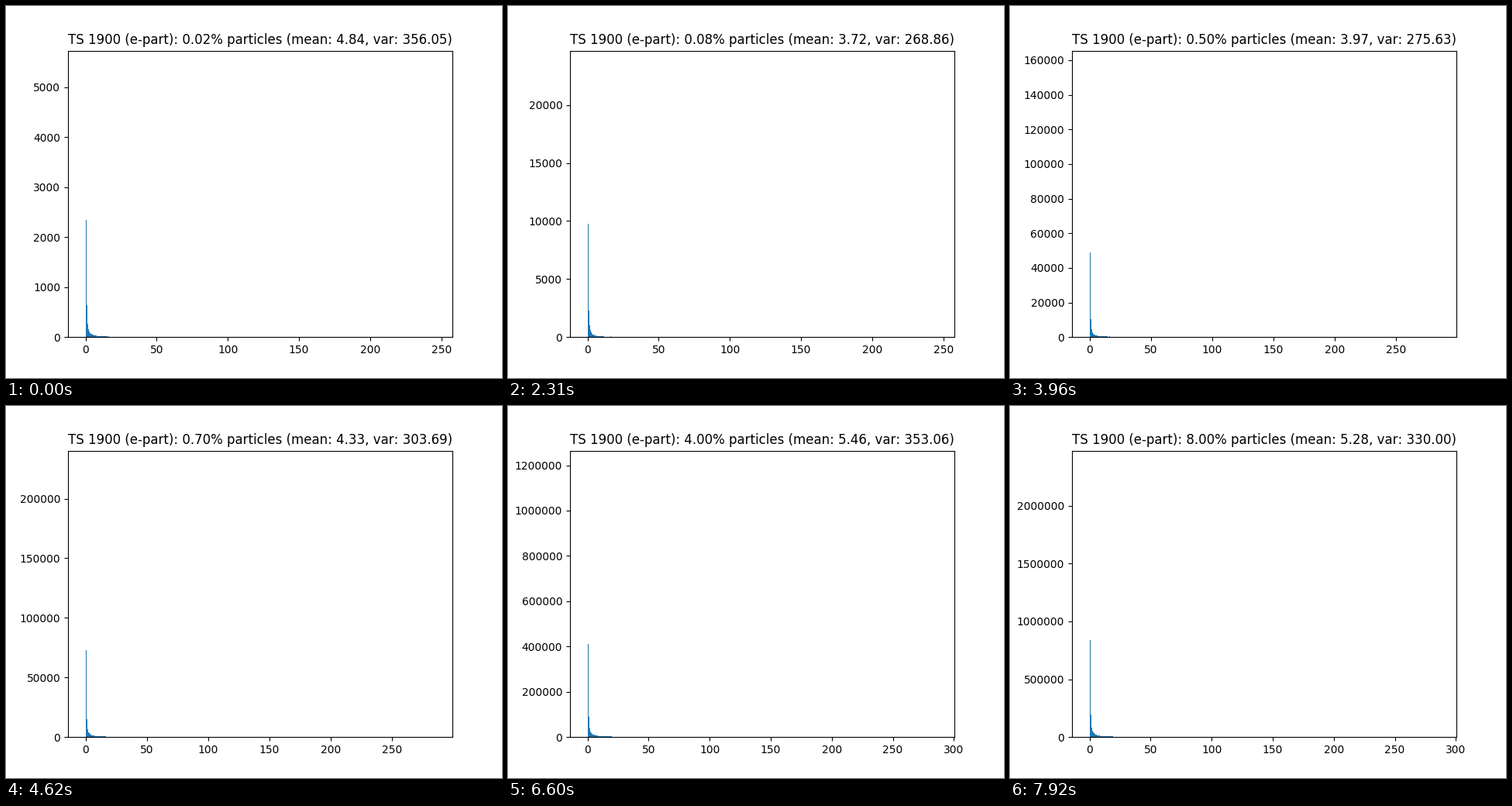
Animation of 640 by 480 pixels, one loop 8000 ms. Source, as a matplotlib script:

```python
import numpy as np
import matplotlib.pyplot as plt
from matplotlib.animation import FuncAnimation

LOOP, INTERVAL, HOLD = 8000, 40, 330
AX_W, AX_H = 496, 369.6          # axes size in pixels
BINS = 60                        # one column per pixel

# Key points: step, mean, variance, y limit per percent (thousands)
KEYS = np.array([
    (0, 4.84, 356.05, 286.75),
    (4, 3.78, 279.51, 303.5),
    (10, 3.61, 247.57, 318.8),
    (14, 4.33, 303.69, 343.2),
    (17, 4.81, 344.24, 338.4),
    (20, 5.46, 353.06, 316.2),
    (24, 5.28, 330.00, 309.5),
]).T


def share(step):
    """0.02 to 0.09, then 0.1 to 0.9, then 1 to 8 percent."""
    decade, digit = divmod(step + 1, 9)
    return (digit + 1) * 10.0 ** (decade - 2)


def data_max(step):
    """Largest value; outliers join once more particles are drawn."""
    if step < 11:
        return 245.5
    return 285.0 if step < 20 else 286.1


def columns(step, mean, scale):
    """Column heights in pixels: a spike followed by a power-law tail."""
    first = 151 - 0.8 * step if step < 11 else 94 + 1.3 * step
    second = first * (0.27 - 0.06 * np.sin(np.pi * step / 30))
    third = 0.43 * second
    reach = 5.6 * mean           # column where the tail drops out of sight
    power = np.log(third / 0.7) / np.log(reach / 2)
    tail = third * (2 / np.arange(2, BINS)) ** power
    h = np.floor(np.r_[first, second, tail] + 0.3)
    bump = int(16 * scale)       # small side peak at value 16
    h[bump] = max(h[bump], 1)
    return np.where(h > 0, h + 0.2, 0)


def draw(i):
    step = (i * INTERVAL + INTERVAL // 2) // HOLD
    mean, var, top = (np.interp(step, KEYS[0], row) for row in KEYS[1:])
    top *= 1000 * share(step)
    span = data_max(step) * 1.1
    left = -span / 22

    ax.clear()
    edges = left + (23 + np.arange(BINS + 1)) * span / AX_W
    heights = columns(step, mean, AX_W / span) * top / AX_H
    ax.stairs(heights, edges, fill=True, color="#1f77b4", lw=0)
    ax.set_xlim(left, left + span)
    ax.set_ylim(0, top)
    ax.ticklabel_format(style="plain")
    ax.set_title(f"TS 1900 (e-part): {share(step):.2f}% particles "
                 f"(mean: {mean:.2f}, var: {var:.2f})")
    return []


plt.rcParams["text.kerning_factor"] = 6
fig, ax = plt.subplots(figsize=(6.4, 4.8), dpi=100)
anim = FuncAnimation(fig, draw, frames=LOOP // INTERVAL, interval=INTERVAL,
                     init_func=lambda: [], repeat=True, repeat_delay=0)
plt.show()
```
